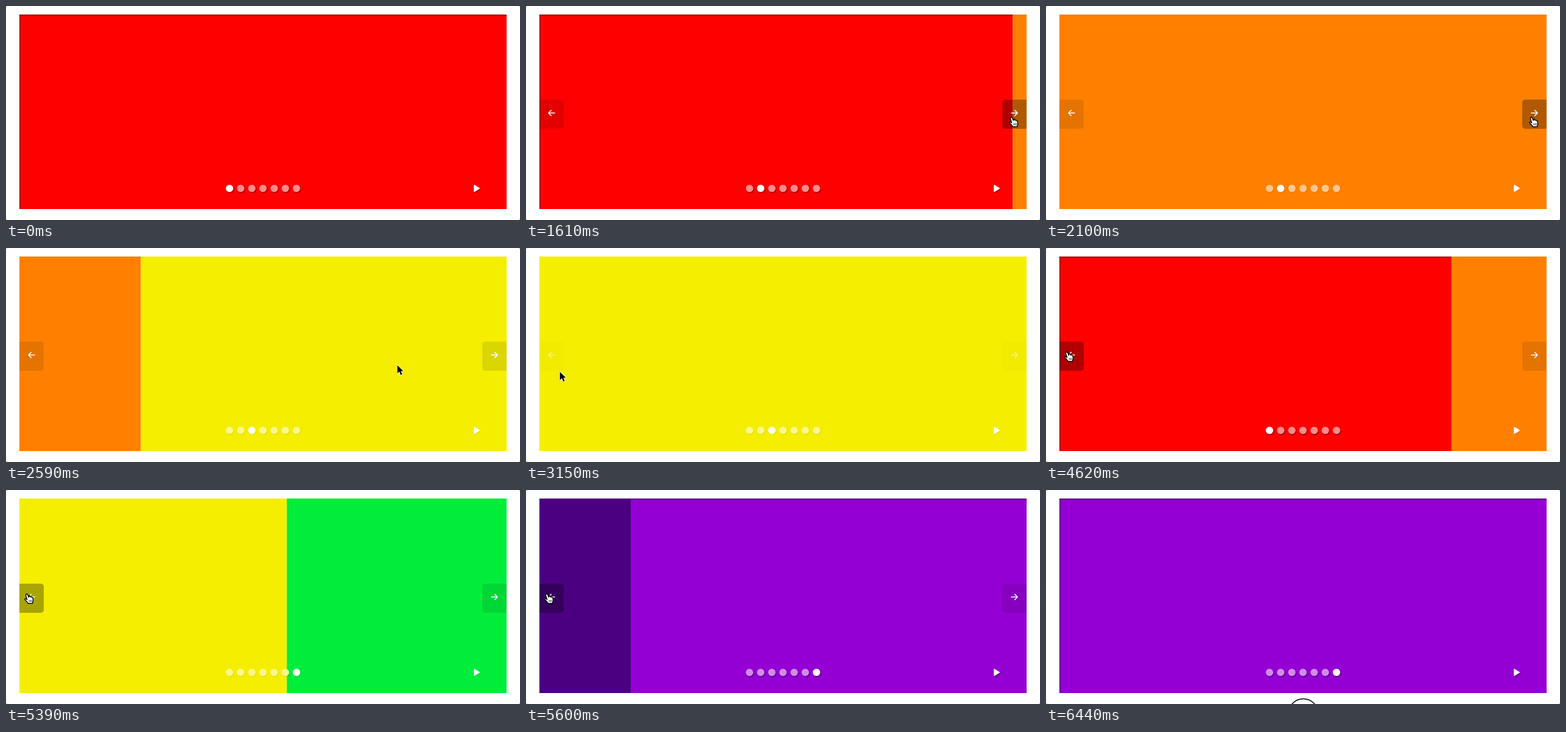
An HTML page with a canvas for the animation above (6.51 s loop, 844 px wide and 352 px high).

```html
<!DOCTYPE html>
<html lang="en">
<head>
<meta charset="utf-8">
<title>Rainbow carousel</title>
<style>
html, body { margin: 0; width: 100%; height: 100%; overflow: hidden; background: #fff; }
canvas { display: block; }
</style>
</head>
<body>
<canvas id="stage" width="844" height="352"></canvas>
<script>
const ctx = document.getElementById('stage').getContext('2d');
const LOOP = 6510, SCROLL = 400, DELAY = 110;
const LEFT = 22, TOP = 14, W = 800, H = 320, RIGHT = LEFT + W;
const COLORS = ['#f00', '#ff8000', '#f5ee00', '#00ee3b', '#00f', '#4b0082', '#9400d3'];
const COUNT = COLORS.length;
const NEXT = { x: 797, y: 183 }, PREV = { x: 34, y: 171 };

// Each click turns one slide on or back, wrapping round
const CLICKS = [
  { time: 1483, step: 1 }, { time: 2300, step: 1 },
  { time: 3550, step: -1 }, { time: 4310, step: -1 }, { time: 5181, step: -1 }
];

// Progress of t through a span, 0 to 1
const part = (t, start, length) => Math.min(1, Math.max(0, (t - start) / length));

// cubic-bezier(.25, .1, .25, 1)
function ease(x) {
  if (x >= 1) return 1;
  const bez = (s, a, b) => 3 * a * s * (1 - s) ** 2 + 3 * b * s * s * (1 - s) + s ** 3;
  let lo = 0, hi = 1;
  for (let i = 0; i < 24; i++) {
    const mid = (lo + hi) / 2;
    if (bez(mid, .25, .25) < x) lo = mid; else hi = mid;
  }
  return bez(lo, .1, 1);
}

function scrollAt(t) {
  let pos = 0, active = 0;
  for (const { time, step } of CLICKS) {
    const start = time + DELAY;
    if (t < start) break;
    const to = (active + step + COUNT) % COUNT;
    pos = active + (to - active) * ease(part(t, start, SCROLL));
    active = to;
  }
  return { pos, active };
}

// A nudge on the right button, then one curved glide to the left button
function pointerAt(t) {
  const nudge = Math.sin(Math.PI * part(t, 490, 350));
  const glide = part(t, 2520, 840);
  const done = 1 - (1 - glide) ** 2.56;
  return {
    x: NEXT.x + 24 * nudge + (PREV.x - NEXT.x) * done,
    y: NEXT.y + (PREV.y - NEXT.y) * done + 46 * Math.sin(Math.PI * glide)
  };
}

// Fade in, dim while the pointer travels, brighten again, fade out
const visibility = (t, enter, back) => part(t, enter, 280)
  - .5 * part(t, 2700, 380) + .5 * part(t, back, 200) - part(t, 5600, 120);

const isDeep = slide => slide % (COUNT - 1) === 0;

function drawSlides(pos) {
  COLORS.forEach((color, i) => {
    const x = LEFT + (i - pos) * W;
    const x0 = Math.max(LEFT, x), x1 = Math.min(RIGHT, x + W);
    if (x1 <= x0) return;
    ctx.fillStyle = color;
    ctx.fillRect(x0, TOP, x1 - x0, H);
    if (!isDeep(i)) return;
    ctx.fillStyle = 'rgba(0,0,0,.13)';
    for (let d = 1; d <= 3; d++) {
      ctx.fillRect(x0, TOP, x1 - x0, d);
      if (x0 === LEFT) ctx.fillRect(LEFT, TOP, d, H);
    }
  });
}

// The shadow stays outside the shape, so translucent fills keep a clean tint
function drawRaised(shape, x, pos, alpha) {
  const under = Math.floor(pos + (x - LEFT) / W);
  ctx.save();
  ctx.shadowColor = `rgba(0,0,0,${isDeep(under) ? .45 : .08})`;
  ctx.shadowBlur = 2;
  ctx.shadowOffsetX = 1;
  ctx.shadowOffsetY = 1.5;
  ctx.fillStyle = COLORS[under];
  ctx.fill(shape);
  ctx.shadowColor = 'transparent';
  ctx.fillStyle = `rgba(255,255,255,${alpha})`;
  ctx.fill(shape);
  ctx.restore();
}

const PLAY = new Path2D('M768.2 295.5Q768.2 293.6 770 294.5L777.5 299.2Q778.7 300 777.5 300.8L770 305.5Q768.2 306.4 768.2 304.5Z');

function drawControls(pos, active) {
  for (let i = 0; i < COUNT; i++) {
    const x = 422 + (i - 3) * 18.33;
    const dot = new Path2D();
    dot.arc(x, 300, 6.1, 0, 7);
    drawRaised(dot, x, pos, i === active ? 1 : .55);
  }
  drawRaised(PLAY, 773, pos, 1);
}

// dir: -1 left, 1 right
function drawButton(dir, show, hover) {
  if (show <= 0) return;
  const left = dir < 0;
  ctx.save();
  ctx.fillStyle = `rgba(0,0,0,${(hover ? .31 : .1) * show ** 3})`;
  ctx.beginPath();
  ctx.roundRect(left ? LEFT : RIGHT - 40, 154, 40, 48, left ? [0, 5, 5, 0] : [5, 0, 0, 5]);
  ctx.fill();
  ctx.translate(left ? 42 : 802, 176);
  ctx.scale(dir, 1);
  ctx.globalAlpha = show;
  ctx.strokeStyle = '#fff';
  ctx.lineWidth = 1.6;
  ctx.lineCap = ctx.lineJoin = 'round';
  ctx.stroke(new Path2D('M-5 0H5M.6-4.5L5 0L.6 4.5'));
  ctx.restore();
}

const ARROW = new Path2D('M0 0V13.5L3.2 10.6L5.6 16L7.9 15L5.6 9.8H9.8Z');
const HAND = new Path2D('M-1.2 .8C-.4-.6 1.2 0 1.7 1.4L3.2 5.4C4-.1 5.4 4 5.8 5C6.8 4.2 7.8 4.5 8.2 5.6' +
  'C9.4 5.2 10 6 10.2 7.2L10.5 10.5C10.6 12 9.6 13 9.5 15.5H2.2C1.4 12.8-1.8 11-3 9.2' +
  'C-3.6 7.8-2.2 7.2-1.1 8L.6 9.2L-1.5 2.6Z');
const FINGERS = new Path2D('M4 10V13M6 10V13M8 10V13');

function drawPointer({ x, y }, hand) {
  ctx.save();
  ctx.translate(x, y);
  ctx.lineJoin = 'round';
  ctx.fillStyle = hand ? '#fff' : '#000';
  ctx.strokeStyle = hand ? '#000' : '#fff';
  ctx.lineWidth = 1.4;
  const shape = hand ? HAND : ARROW;
  if (hand) ctx.fill(shape);
  ctx.stroke(shape);
  if (!hand) ctx.fill(shape);
  if (hand) {
    ctx.lineWidth = .8;
    ctx.stroke(FINGERS);
  }
  ctx.restore();
}

function drawRing(x, y, r) {
  ctx.strokeStyle = '#000';
  ctx.lineWidth = 1.5;
  ctx.beginPath();
  ctx.arc(x, y, r, 0, 7);
  ctx.stroke();
}

function draw(t) {
  ctx.fillStyle = '#fff';
  ctx.fillRect(0, 0, 844, 352);
  ctx.fillStyle = '#777';
  for (const x of [0, 843]) for (const y of [0, 351]) ctx.fillRect(x, y, 1, 1);

  const { pos, active } = scrollAt(t);
  const pointer = pointerAt(t);
  const onLeft = pointer.x < 62 && pointer.y < 202;
  const onRight = pointer.x > 778 && pointer.y < 202;
  drawSlides(pos);
  drawControls(pos, active);
  drawButton(-1, visibility(t, 1190, 3150), onLeft);
  drawButton(1, visibility(t, 490, 3600), onRight);
  if (t >= 140 && t < 5680) drawPointer(pointer, onLeft || (onRight && t >= 840));

  for (const { time, step } of CLICKS) {
    const spot = step > 0 ? NEXT : PREV;
    if (t >= time - 15 && t < time + DELAY) drawRing(spot.x + 1, spot.y, 31.5);
  }
  if (t >= 6440) drawRing(422.5, 368, 24.5);
}

const begin = performance.now();
function tick() {
  draw((performance.now() - begin) % LOOP);
  requestAnimationFrame(tick);
}
tick();
</script>
</body>
</html>
```
